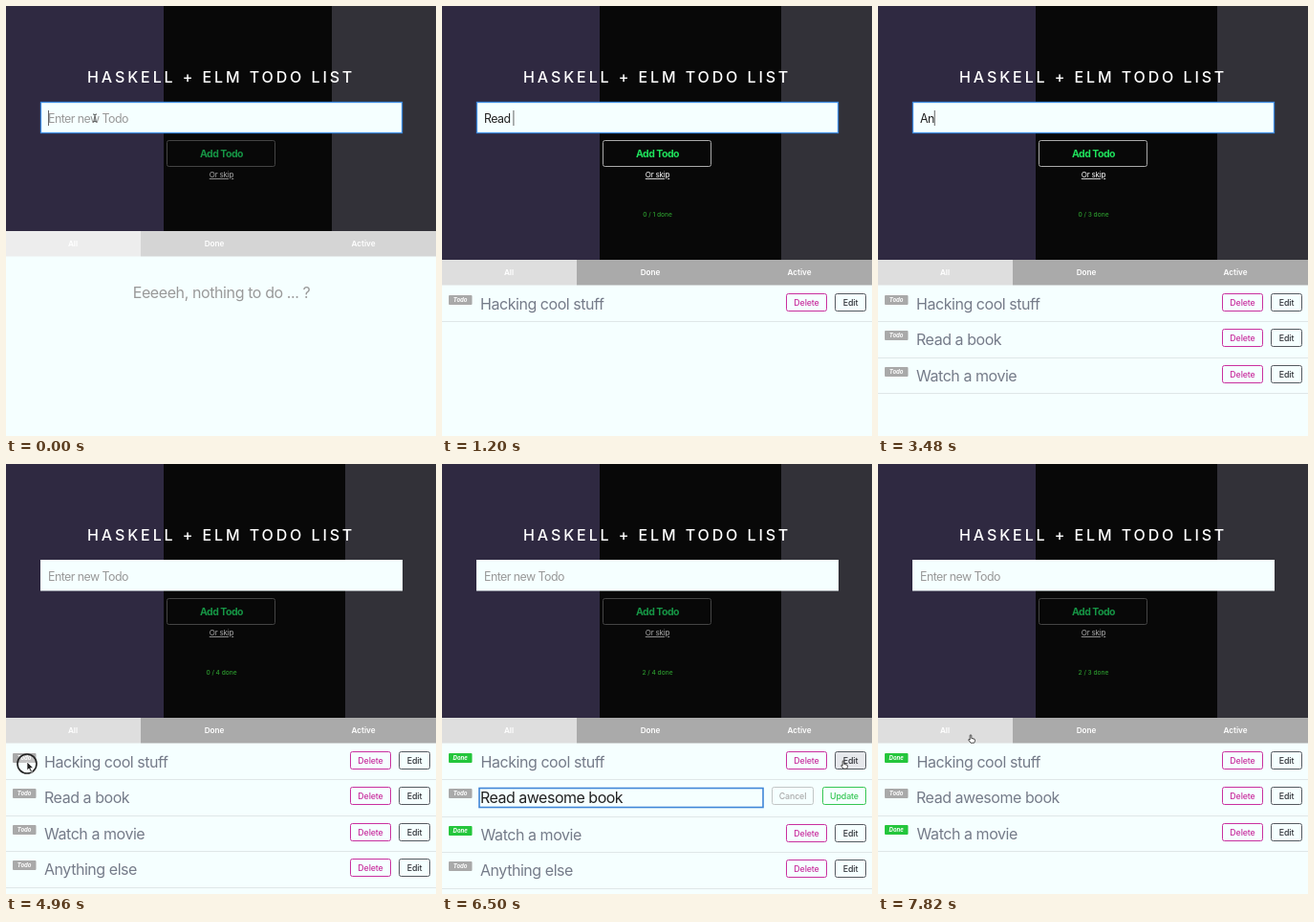
An HTML page for the animation above (7840 ms loop, 450 by 449 pixels).

```html
<!DOCTYPE html>
<html lang="en">
<head>
<meta charset="utf-8">
<title>Todo list</title>
<style>
html, body { margin: 0; width: 100%; height: 100%; overflow: hidden; background: #f5ffff; }
svg { display: block; width: 450px; height: 449px; font-family: Inter, "Liberation Sans", sans-serif; white-space: pre; }
</style>
</head>
<body>
<svg id="stage" viewBox="0 0 450 449"></svg>
<script>
const LOOP = 7840;
const stage = document.getElementById('stage');
const pen = document.createElement('canvas').getContext('2d');

// text, first key, time per key, time it is added
const entries = [
  ['Hacking cool stuff', 60, 38, 840],
  ['Read a book', 1000, 42, 1720],
  ['Watch a movie', 1780, 35, 2380],
  ['Anything else', 3432, 46, 4460]
];
// pointer stops: time, x, y
const path = [
  [4560, 93, 117], [4900, 22, 312], [5000, 22, 312], [5300, 19, 382], [5420, 19, 382],
  [5800, 425, 345], [5980, 425, 345], [6200, 420, 311], [6540, 420, 311],
  [6680, 421, 344], [6760, 421, 344], [6920, 381, 421], [7020, 381, 421],
  [7180, 225, 278], [7280, 225, 278], [7420, 288, 281], [7500, 340, 280],
  [7580, 340, 280], [7690, 97, 284], [LOOP, 97, 284]
];
const clicks = [4960, 5360, 5880, 6720, 6980, 7220, 7530, 7720];
const [done1, done3, edit, update, remove, showDone, showActive, showAll] = clicks.map(c => c + 30);

const rect = (x, y, w, h, fill, more = '') =>
  `<rect x="${x}" y="${y}" width="${w}" height="${h}" fill="${fill}" ${more}/>`;
const text = (x, y, str, size, fill, gap = 0, more = '') =>
  `<text x="${x}" y="${y}" font-size="${size}" fill="${fill}" letter-spacing="${gap}" ${more}>${str}</text>`;
const label = (x, y, str, size, fill, gap, more = '') =>
  text(x, y, str, size, fill, gap, 'text-anchor="middle" ' + more);

function widthOf(str, size, gap) {
  pen.font = size + 'px Inter, "Liberation Sans", sans-serif';
  return pen.measureText(str).width + str.length * gap;
}

function pointerAt(t) {
  if (t < 60) return { x: 93, y: 117, kind: 'beam' };
  const i = path.findIndex(p => p[0] > t);
  if (i < 1) return null;
  const [t0, x0, y0] = path[i - 1], [t1, x1, y1] = path[i];
  const u = (t - t0) / (t1 - t0), k = u * u * (3 - 2 * u);
  return { x: x0 + (x1 - x0) * k, y: y0 + (y1 - y0) * k, kind: 'arrow' };
}

function header(t, h, items, typed) {
  const live = typed.length > 0, focus = t < 4940;
  const right = h > 240 ? 355 : 341;
  let s = rect(0, 0, 450, h, '#080808') +
    rect(165 - h, 0, h, h, '#2f2941') + rect(right, 0, h, h, '#323138') +
    text(85, 80, 'HASKELL + ELM TODO LIST', 16, '#fff', 2.9, 'font-weight="500"') +
    rect(36, 100, 379, 32.5, '#f5ffff');
  if (focus) s += rect(36.5, 100.5, 378, 32, 'none', 'stroke="#3c8ae0" stroke-width="1.3"');
  s += text(44, 121.5, typed || 'Enter new Todo', 12.4, live ? '#222' : '#999', -.55);
  const idle = t > 2500 && t < 3400 || t > 4100;
  if (focus && !(idle && t % 1000 > 500))
    s += rect(44 + widthOf(typed, 12.4, -.55), 109, 1, 16, '#666');
  s += rect(168.5, 140.5, 113, 27, 'none', `rx="2" stroke="${live ? '#aaa' : '#444'}"`) +
    label(225.5, 157.5, 'Add Todo', 10.5, live ? '#1fe25c' : '#169545', -.5, 'font-weight="700"') +
    label(225.5, 179, 'Or skip', 8, live ? '#fff' : '#aaa', -.2, 'text-decoration="underline"');
  if (items.length)
    s += label(225.5, 219.5, `${items.filter(i => i.done).length} / ${items.length} done`, 6.6, '#2c9a2e', 0, 'font-weight="500"');
  return s;
}

function tabs(y, picked, enabled) {
  const edges = [0, 141, 295, 450], mids = [70, 218, 374];
  return ['All', 'Done', 'Active'].map((name, i) => {
    const fill = i === picked ? (enabled ? '#dedede' : '#ededed') : (enabled ? '#aaa' : '#d5d5d5');
    return rect(edges[i], y, edges[i + 1] - edges[i], 26.5, fill) +
      label(mids[i], y + 16, name, 8.2, '#fff', 0, 'font-weight="600"');
  }).join('');
}

function list(t, items, at) {
  let top = 291.5, y, s = '';
  const button = (x, w, str, color, frame = color) => {
    const over = at && at.x > x && at.x < x + w && at.y > y + 8 && at.y < y + 27;
    if (over) at.kind = 'hand';
    s += rect(x + .5, y + 8.5, w - 1, 18, over ? '#e6e8ec' : 'none', `rx="2" stroke="${frame}"`) +
      label(x + w / 2, y + 20.7, str, 8.8, color, -.1, 'font-weight="500"');
  };
  for (const item of items) {
    y = Math.round(top);
    const editing = item.id === 1 && t >= edit && t < update;
    s += rect(7, y + 10, 24.5, 10, item.done ? '#24c63c' : '#a9a9a9', 'rx="1"') +
      label(19.2, y + 17.2, item.done ? 'Done' : 'Todo', 6, '#fff', 0, 'font-weight="700" font-style="italic"');
    if (editing) {
      const start = 'Read a' + 'wesome'.slice(0, Math.max(0, Math.floor((t - 6040) / 45)));
      s += rect(39, y + 9.5, 297, 20, '#f5ffff', 'stroke="#3f86d8" stroke-width="1.6"') +
        text(40, y + 25, start + ' book', 16, '#222', -.5);
      if (t < 6400) s += rect(40 + widthOf(start, 16, -.5), y + 11, 1, 17, '#333');
      button(345, 44, 'Cancel', '#aaa', '#c2c6c6');
      button(398, 46, 'Update', '#35c653');
    } else {
      s += text(item.done ? 40.6 : 40, y + 24.6, item.text, 16, '#757b89', -.45);
      button(360, 43, 'Delete', '#c9309f');
      button(411, 33, 'Edit', '#2e3036', '#555960');
    }
    top += editing ? 38.5 : 37.5;
    s += rect(0, Math.round(top), 450, 1, '#dfe7e8');
  }
  return s;
}

function pointer(t, at) {
  const shapes = {
    beam: '<path d="M-2-4q2 0 2 1q0-1 2-1M0-3V3M-2 4q2 0 2-1q0 1 2 1" fill="none" stroke="#222" stroke-width=".8"/>',
    arrow: '<path d="M0-1V8l2-2 2 4 1.500-.7-1.800-3.800h3z" fill="#222" stroke="#fff" stroke-width=".7"/>',
    hand: '<path transform="scale(.8)" d="M-1-1q1-1 2 0V3l4 1q1 1 .5 3L4.500 9H0L-3 5q0-1.500 2 0z" fill="#fff" stroke="#222"/>'
  };
  const ring = clicks.some(c => t > c - 40 && t < c + 60)
    ? '<circle cy="1" r="10" fill="#fff" fill-opacity=".3" stroke="#222" stroke-width="1.6"/>' : '';
  return `<g transform="translate(${at.x} ${at.y})">${ring}${shapes[at.kind]}</g>`;
}

function draw(t) {
  const items = entries.map(([str, , , added], id) => ({
    id, added,
    text: id === 1 && t >= update ? 'Read awesome book' : str,
    done: id === 0 && t >= done1 || id === 2 && t >= done3
  })).filter(i => t >= i.added && !(i.id === 3 && t >= remove));
  const current = entries.find(e => t >= e[1] && t < e[3]);
  const typed = current ? current[0].slice(0, Math.floor((t - current[1]) / current[2]) + 1) : '';
  const picked = t >= showAll || t < showDone ? 0 : t < showActive ? 1 : 2;
  const shown = items.filter(i => !picked || i.done === (picked === 1));
  const h = items.length ? 265 : 235;
  const at = pointerAt(t);
  if (at && at.y > h && at.y < h + 26) at.kind = 'hand';

  let s = rect(0, 0, 450, 449, '#f5ffff') + header(t, h, items, typed) + tabs(h, picked, items.length > 0);
  s += items.length ? list(t, shown, at)
    : label(225.5, 305, 'Eeeeeh, nothing to do ... ?', 16, '#999', -.4);
  if (at) s += pointer(t, at);
  stage.innerHTML = s;
}

const begin = performance.now();
function frame() {
  draw((performance.now() - begin) % LOOP);
  requestAnimationFrame(frame);
}
frame();
</script>
</body>
</html>
```
